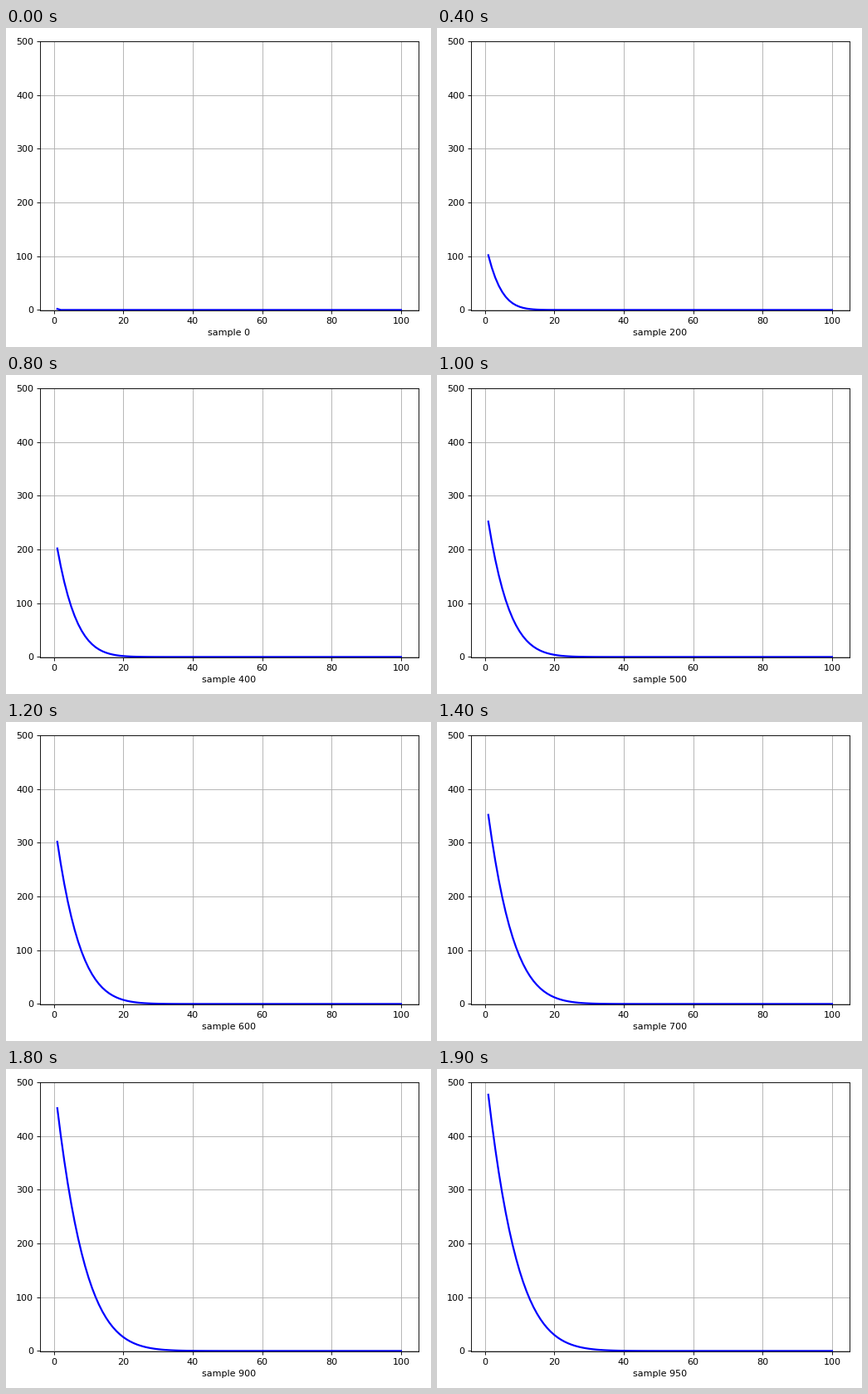
A matplotlib script that plays this animation: 512 by 384 pixels, repeating every 2 s.

```python
import numpy as np
import matplotlib.pyplot as plt
from matplotlib.animation import FuncAnimation

W, H, DPI = 512, 384, 80
FRAMES, STEP = 20, 50
CELLS, RATE = 100, 0.1


def diffuse():
    """Diffusion along a rod whose first cell warms steadily."""
    u = np.zeros(CELLS)
    u[0] = 2
    states = []
    for n in range(FRAMES * STEP):
        if n % STEP == 0:
            states.append(u.copy())
        u[1:-1] += RATE * (u[2:] - 2 * u[1:-1] + u[:-2])
        u[0] += 0.5
    return states


plt.rcParams["font.family"] = "DejaVu Sans"
plt.rcParams["font.size"] = 10

states = diffuse()
x = np.arange(1, CELLS + 1)

fig, ax = plt.subplots(figsize=(W / DPI, H / DPI), dpi=DPI)
fig.subplots_adjust(left=41.1 / W, right=496.6 / W,
                    bottom=1 - 340.04 / H, top=1 - 16 / H)
line, = ax.plot(x, states[0], "b-", lw=2)
ax.set_xlim(-3.95, 104.95)
ax.set_ylim(-1, 500)
ax.grid(True)
label = ax.set_xlabel("sample 0")


def update(i):
    line.set_ydata(states[i])
    label.set_text(f"sample {i * STEP}")
    return line, label


anim = FuncAnimation(fig, update, frames=FRAMES, interval=100,
                     repeat=True, repeat_delay=0, blit=False)
plt.show()
```
